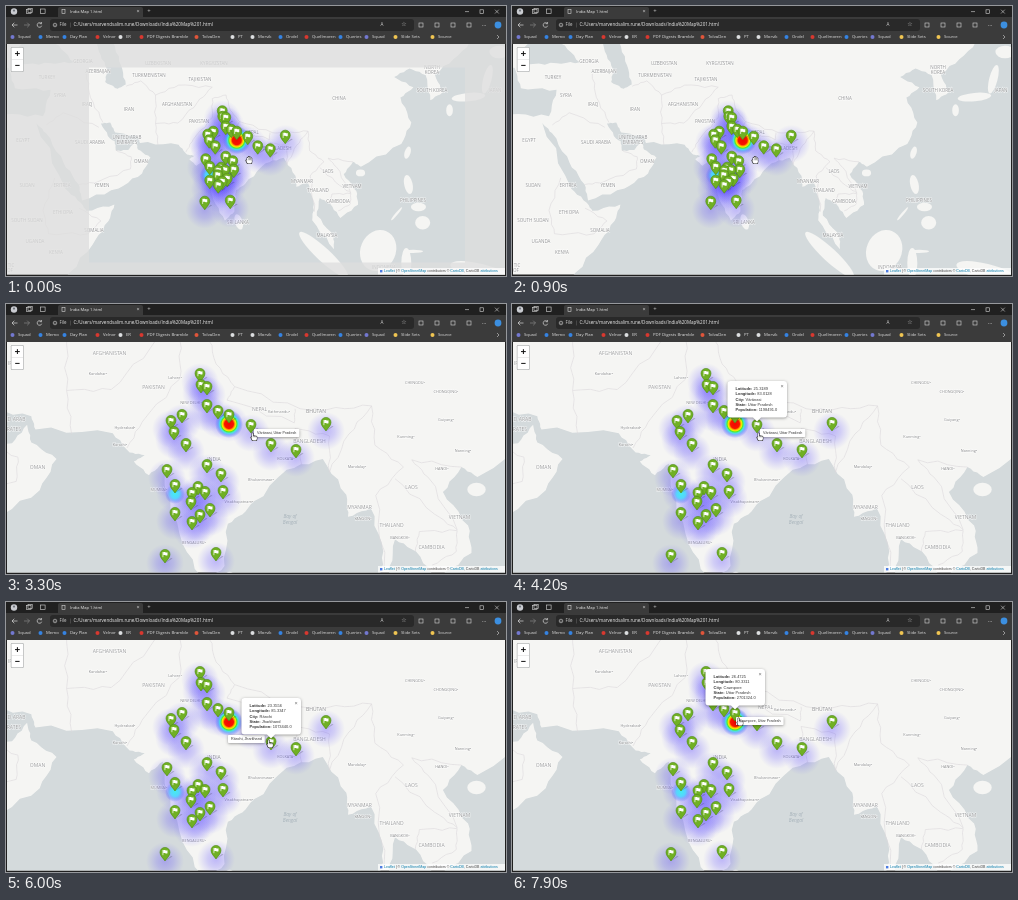
Write an HTML page with a canvas that moves like this. It is 500 by 270 pixels and loops after 8 s.

```html
<!DOCTYPE html>
<html lang="en">
<head>
<meta charset="utf-8">
<title>India Map</title>
<style>
html, body { margin: 0; width: 100%; height: 100%; overflow: hidden; background: #202020; }
canvas { display: block; width: 500px; height: 270px; }
</style>
</head>
<body>
<canvas id="stage"></canvas>
<script>
const canvas = document.getElementById('stage'), c = canvas.getContext('2d');
const dpr = window.devicePixelRatio || 1;
canvas.width = 500 * dpr;
canvas.height = 270 * dpr;

const LOOP = 8000, STEP = 100, CX = 238.5, CY = 148.5;
const UI = '"Open Sans", "Noto Sans", sans-serif', ARIAL = '"Liberation Sans", Arial, sans-serif';
const SEA = '#d4dadc', LAND = '#f5f5f3';

// Flat lon, lat pairs
const coast = [39.2,-6, 46,2.4, 49.8,8, 51.2,11.9, 44.5,10.4, 43.2,12.3, 39.5,15.5, 32.6,29.9, 34.9,27.8, 39.1,21.4,
  42.7,16.5, 43.5,12.8, 52.2,15.6, 57.8,19, 59.8,22.5, 56.8,24.3, 56.3,26.2, 54.5,24.2, 51.6,24, 51.3,26, 50.2,26.6, 48,29.8,
  50.2,30, 51.4,27.9, 56.8,27.1, 57.3,25.7, 66.5,25.3, 68.5,23.2, 70.3,22.9, 69,22.2, 70.8,20.7, 72.5,22, 72.8,19,
  74.8,12.9, 77.5,8.1, 79.8,10.3, 80.2,15.2, 82.3,16.6, 87.2,21.3, 91.5,22.5, 94.3,18.5, 94.5,16, 97.2,17,
  98.7,12, 98.3,8.2, 103.5,1.3, 103.4,4.3, 99.4,9.3, 100.1,13.4, 102.6,12, 105,8.7, 109.2,11.8, 108.8,15, 105.8,18.8,
  108,21.6, 109.9,20.5, 119.5,25.5, 121.9,30, 119.3,35, 122.4,37, 117.8,38.9, 121.5,40.5, 125.3,39.3, 126.4,34.5,
  129.3,36, 127.5,39.4, 133,42.8, 138,46.5, 150,46.5, 150,-6];
const inland = [
  [47.5,43.5, 49.5,40.3, 49,38, 52,36.7, 53.9,37.5, 52.8,41, 51,45, 47,45],
  [28,44, 29,41.2, 36,41.4, 41.5,41.6, 38,44.5, 31,46],
  [22,41, 26,40.6, 27.5,36.8, 36,36.5, 34.2,31.3, 25,31.7]
];
// lon, lat, half width, half height in degrees, tilt
const islands = [[80.8,7.8,.9,1.9,-.3], [101,0,7.8,1.6,.75], [114,1,4.2,5,.4], [120.7,-2,1.2,3.6], [122.3,.8,2.4,.4],
  [121.2,16.5,1,2.3,-.2], [123.6,11.3,1.8,1], [124.6,7.6,1.8,1.6], [118.4,9.7,.3,2,.7], [121,23.6,.7,1.5,.3],
  [109.8,19.1,1.1,.8], [131,32.5,.8,1.4], [135.5,35.1,4,1,-.1], [140,38.5,1,3.5,.25], [142.8,43.4,2.3,1.5],
  [138.5,-4.2,7.5,2,.25]];
const borders = [
  [68.2,23.7, 70,26.5, 74.5,31, 74.5,34.8, 77.8,35.5, 78.8,32.5, 81,30.2, 88.8,27.9, 92,27.8, 97.3,28.2],
  [81,30.2, 80.1,28.8, 88.1,26.4, 88.2,27.9],
  [89,21.8, 88.2,25.8, 92.3,25, 92.3,21, 94.6,25.2, 97.3,28.2, 97.7,24, 101.1,21.6, 97.8,18.4, 98.8,10.2],
  [100.1,20.3, 104.8,16.3, 107.5,14.5, 104,20.5, 102.1,22.4, 108,21.6],
  [102.5,12, 103,14.3, 107.5,14.4, 107.4,12, 104.5,10.4],
  [61.6,25.2, 61,29.8, 66.3,29.9, 70.9,34, 74.5,37, 66.5,37.4, 61,35.5, 61,29.8],
  [54,37.2, 57.5,38.2, 61,35.5],
  [48.5,30, 45.5,35, 44.5,39.5],
  [35,29.5, 39,32, 47.5,29],
  [42.8,16.5, 47,17, 55,20, 55.2,22.7, 51.5,24.2],
  [37,18, 34.2,10.5, 35.5,5, 45,5, 48,8, 42.8,11]
];

const countries = [['TURKEY',41,72], ['EGYPT',17,135], ['SYRIA',54,90], ['IRAQ',81,99], ['IRAN',123,104],
  ['GEORGIA',77,56], ['AZERBAIJAN',92,66], ['TURKMENISTAN',143,70], ['UZBEKISTAN',152,58], ['KYRGYZSTAN',208,58],
  ['TAJIKISTAN',194,74], ['AFGHANISTAN',171,99], ['PAKISTAN',193,116], ['CHINA',333,93], ['NEPAL',246,127],
  ['BANGLADESH',271,143], ['MYANMAR',296,176], ['LAOS',322,166], ['VIETNAM',346,181], ['THAILAND',312,185],
  ['CAMBODIA',332,196], ['SRI LANKA',232,217], ['MALAYSIA',321,230], ['PHILIPPINES',407,195], ['NORTH',426,62],
  ['KOREA',426,67], ['SOUTH KOREA',426,85], ['JAPAN',489,85], ['SAUDI ARABIA',84,137],
  ['UNITED ARAB',121,132], ['EMIRATES',121,137], ['OMAN',135,156], ['YEMEN',96,180], ['ERITREA',56,180],
  ['SUDAN',21,180], ['ETHIOPIA',57,207], ['SOUTH SUDAN',21,215], ['SOMALIA',88,225], ['UGANDA',29,236],
  ['KENYA',50,247], ['INDONESIA',378,262], ['TIC',5,260], ['OF',4,265]];
const cities = [['BHUTAN',310,108], ['INDIA',208,156], ['NEW DELHI•',185,99], ['Kandahar•',92,70], ['Lahore•',169,74],
  ['Karachi•',114,141], ['Hyderabad•',119,124], ['Kathmandu•',273,108], ['MUMBAI•',153,186], ['KOLKATA•',280,155],
  ['Bhubaneswar•',255,176], ['Visakhapatnam•',233,198], ['BENGALURU•',188,239], ['CHENGDU•',409,79],
  ['CHONGQING•',440,88], ['Guiyang•',440,116], ['Kunming•',400,133], ['Nanning•',457,147], ['HANOI•',436,165],
  ['Mandalay•',351,163], ['YANGON•',357,215], ['BANGKOK•',394,234]];

// Pin tips at the closer zoom
const pins = [[194,78], [195,89], [201,91], [201,109], [212,115], [176,119], [223,119], [165,125], [320,127], [245,129],
  [168,136], [180,148], [265,148], [290,154], [201,169], [161,174], [215,178], [169,189], [192,191], [217,195], [199,196],
  [186,197], [185,206], [204,213], [169,217], [194,219], [186,226], [210,257], [159,259]];

const popups = [
  { on: 3900, off: 5700, x: 245, y: 121, rows: ['25.3189', '83.0128', 'Vārānasi', 'Uttar Pradesh', '1198491.0'] },
  { on: 5700, off: 7400, x: 265, y: 140, rows: ['23.3556', '85.3347', 'Rānchi', 'Jharkhand', '1073440.0'] },
  { on: 7400, off: LOOP, x: 223, y: 111, rows: ['26.4725', '80.3311', 'Cawnpore', 'Uttar Pradesh', '2701324.0'] }
];
const fields = ['Latitude', 'Longitude', 'City', 'State', 'Population'];
const tooltips = [
  { on: 2900, off: 4400, x: 248, y: 125, label: 'Vārānasi, Uttar Pradesh' },
  { on: 5000, off: 6200, x: 222, y: 133, label: 'Rānchi, Jharkhand' },
  { on: 7000, off: LOOP, x: 224, y: 115, label: 'Cawnpore, Uttar Pradesh' }
];
// time, x, y
const cursorPath = [[0,243,154], [2300,243,154], [2900,248,133], [4400,248,133], [5000,264,142], [6200,264,142],
  [6900,230,122], [7200,228,120], [LOOP,228,120]];

const PURPLE = '#7378d0', BLUE = '#3583e2', RED = '#d8382f', YELLOW = '#f0c552', PALE = '#dcdee0';
const bookmarks = [['Squad',6,PURPLE], ['Memo',34,BLUE], ['Day Plan',58,BLUE], ['Velnor',91,RED],
  ['ER',114,PALE], ['PDF Digests Bramble',135,RED], ['TolvaDen',190,'#e0553a'], ['PT',226,PALE],
  ['Morvik',246,PALE], ['Ondel',274,BLUE], ['Quellmoren',300,RED], ['Queries',334,BLUE],
  ['Squad',360,PURPLE], ['Slide Sets',389,YELLOW], ['Source',426,YELLOW]];

const clamp = v => Math.max(0, Math.min(1, v));
const ramp = (t, from, length) => clamp((t - from) / length);

function project(lon, lat) {
  return [8.4 * lon - 451.8, 348.95 - 481.3 * Math.asinh(Math.tan(lat * Math.PI / 180))];
}

// Adds small bends between the points
function trace(path, points) {
  let last;
  for (let i = 0; i < points.length; i += 2) {
    const [x, y] = project(points[i], points[i + 1]);
    if (last) {
      const dx = x - last[0], dy = y - last[1];
      for (let j = 1; j < 5; j++) {
        const bend = .035 * Math.sin(i * 5 + j * 2.3);
        path.lineTo(last[0] + dx * j / 5 - dy * bend, last[1] + dy * j / 5 + dx * bend);
      }
      path.lineTo(x, y);
    } else path.moveTo(x, y);
    last = [x, y];
  }
}

const seaPath = new Path2D(), islandPath = new Path2D(), borderPath = new Path2D();
[coast, ...inland].forEach(s => trace(seaPath, s));
borders.forEach(b => trace(borderPath, b));
for (const [lon, lat, w, h, tilt = 0] of islands) {
  const island = new Path2D();
  island.ellipse(...project(lon, lat), w * 8.4, h * 8.4, tilt, 0, 2 * Math.PI);
  islandPath.addPath(island);
}

function text(str, x, y, size, color, { font = UI, align = 'left', weight = '', halo } = {}) {
  c.font = `${weight} ${size}px ${font}`;
  c.textAlign = align;
  c.textBaseline = 'middle';
  if (halo) {
    c.strokeStyle = halo;
    c.lineWidth = 1;
    c.strokeText(str, x, y);
  }
  c.fillStyle = color;
  c.fillText(str, x, y);
  return c.measureText(str).width;
}

function box(x, y, w, h, r, fill) {
  c.beginPath();
  c.roundRect(x, y, w, h, r);
  c.fillStyle = fill;
  c.fill();
}

function dot(x, y, r, fill) {
  c.beginPath();
  c.arc(x, y, r, 0, 7);
  c.fillStyle = fill;
  c.fill();
}

function line(color, width, ...points) {
  c.beginPath();
  for (let i = 0; i < points.length; i += 2) c.lineTo(points[i], points[i + 1]);
  c.strokeStyle = color;
  c.lineWidth = width;
  c.stroke();
}

function glow(x, y, r, stops) {
  const g = c.createRadialGradient(x, y, 0, x, y, r);
  stops.forEach(([at, color]) => g.addColorStop(at, color));
  dot(x, y, r, g);
}

function zoomAround(s) {
  c.translate(CX, CY);
  c.scale(s, s);
  c.translate(-CX, -CY);
}

function drawLand(k) {
  c.save();
  c.fillStyle = LAND;
  c.fillRect(0, 0, 500, 270);
  zoomAround(k);
  c.fillStyle = SEA;
  c.fill(seaPath);
  c.fillStyle = LAND;
  c.fill(islandPath);
  c.strokeStyle = '#dcd9dc';
  c.lineWidth = .6 / k;
  c.stroke(borderPath);
  c.restore();
}

function drawLabels(k, near) {
  const opts = { align: 'center', halo: 'rgba(255,255,255,.75)' };
  c.save();
  c.globalAlpha = 1 - near;
  zoomAround(k * 2);
  if (near < 1) countries.forEach(([s, x, y]) => text(s, x, y, 4.5, '#8f9092', opts));
  c.restore();
  if (!near) return;
  c.globalAlpha = near;
  for (const [s, x, y] of countries) {
    const ny = 2 * y - CY;
    if (ny > 42) text(s, 2 * x - CX, ny, 5, '#98999b', opts);
  }
  cities.forEach(([s, x, y]) => text(s, x, y, s.endsWith('•') ? 3.8 : 5, '#87888a', opts));
  ['Bay of', 'Bengal'].forEach((s, i) => text(s, 284, 213 + i * 6, 4.8, '#a4b0b8', { align: 'center', weight: 'italic' }));
  c.globalAlpha = 1;
}

function drawHeat(place) {
  for (const p of pins) {
    const [x, y] = place(p);
    glow(x, y, 19, [[0, 'rgba(90,70,255,.36)'], [.45, 'rgba(95,80,255,.24)'], [1, 'rgba(110,100,255,0)']]);
  }
  glow(...place([169, 190]), 10, [[0, 'rgba(60,240,240,.95)'], [.45, 'rgba(70,215,255,.85)'], [.7, 'rgba(90,150,255,.5)'], [1, 'rgba(90,90,255,0)']]);
  glow(...place([223, 120]), 14, [[0, '#f00800'], [.32, '#f81400'], [.42, '#ffb000'], [.49, '#f4f000'], [.56, '#50e830'],
    [.66, 'rgba(60,230,220,.9)'], [.78, 'rgba(80,150,255,.6)'], [1, 'rgba(90,90,255,0)']]);
}

function drawPin([x, y]) {
  c.save();
  c.translate(x, y);
  c.beginPath();
  c.moveTo(0, 0);
  c.lineTo(6, -5);
  c.lineTo(7.5, -4.5);
  c.fillStyle = 'rgba(40,40,60,.25)';
  c.fill();
  c.beginPath();
  c.moveTo(0, 0);
  c.bezierCurveTo(-1.5, -2.6, -5, -5, -5, -8.6);
  c.arc(0, -8.6, 5, Math.PI, 0);
  c.bezierCurveTo(5, -5, 1.5, -2.6, 0, 0);
  c.fillStyle = '#70b024';
  c.fill();
  c.strokeStyle = '#4f8a1a';
  c.lineWidth = .6;
  c.stroke();
  line('#fff', .7, -2.1, -11, -2.1, -5.8);
  c.beginPath();
  c.moveTo(-1.8, -10.7);
  c.bezierCurveTo(0, -11.8, .8, -9.6, 2.5, -10.7);
  c.lineTo(2.5, -7.8);
  c.bezierCurveTo(.8, -6.7, 0, -8.9, -1.8, -7.8);
  c.fillStyle = '#fff';
  c.fill();
  c.restore();
}

function withShadow(draw) {
  c.save();
  c.shadowColor = 'rgba(0,0,0,.4)';
  c.shadowBlur = 3 * dpr;
  c.shadowOffsetY = .7 * dpr;
  draw();
  c.restore();
}

function drawPopup(t, { on, off, x, y, rows }) {
  if (t < on || t >= off) return;
  const left = x - 29.5, top = y - 44;
  c.save();
  c.globalAlpha = ramp(t, on - 100, 200);
  withShadow(() => {
    c.beginPath();
    c.roundRect(left, top, 59.5, 36.5, 3.2);
    c.moveTo(x + 4, top + 36.4);
    c.lineTo(x, top + 40.5);
    c.lineTo(x - 4, top + 36.4);
    c.fillStyle = '#fff';
    c.fill();
  });
  rows.forEach((value, i) => {
    const ly = top + 8 + i * 5.2;
    const w = text(fields[i] + ':', left + 8, ly, 4, '#333', { font: ARIAL, weight: 'bold' });
    text(value, left + 9.2 + w, ly, 4, '#333', { font: ARIAL });
  });
  text('×', left + 54.5, top + 5, 5.5, '#666', { font: ARIAL, align: 'center' });
  c.restore();
}

function drawTooltip(t, { on, off, x, y, label }) {
  if (t < on || t >= off) return;
  c.font = `3.7px ${ARIAL}`;
  const w = c.measureText(label).width;
  withShadow(() => box(x, y, w + 6, 8, .8, '#fff'));
  text(label, x + 3, y + 4.2, 3.7, '#333', { font: ARIAL });
}

function drawCursor(t) {
  const i = cursorPath.findIndex(p => p[0] > t);
  const [t0, x0, y0] = cursorPath[i - 1], [t1, x1, y1] = cursorPath[i];
  const p = ramp(t, t0, t1 - t0), e = p * p * (3 - 2 * p);
  const pointing = tooltips.some(tip => t >= tip.on - 100 && t < tip.off);
  const fingers = pointing ? [-3.6, -.8, -.6, -.2] : [-2, -3, -2.6, -1.5];
  c.save();
  c.translate(x0 + (x1 - x0) * e, y0 + (y1 - y0) * e);
  c.lineCap = 'round';
  // Dark pass first gives the outline
  for (const [color, grow] of [['#222', .5], ['#fff', 0]]) {
    fingers.forEach((tip, n) => line(color, 1 + 2 * grow, n * 1.2 - 1.4, tip, n * 1.2 - 1.4, 1.5));
    line(color, 1 + 2 * grow, -2.6, .6, -1, 2.6);
    box(-1.9 - grow, .2 - grow, 4.6 + 2 * grow, 3.2 + 2 * grow, 1, color);
  }
  c.restore();
}

function drawControls() {
  box(4.8, 41, 13, 25, 1.3, '#b4b6b6');
  box(5.5, 41.7, 11.6, 23.6, .8, '#fff');
  line('#ccc', .4, 5.5, 53.5, 17.1, 53.5);
  line('#111', 1, 9, 47.6, 13.8, 47.6);
  line('#111', 1, 11.4, 45.2, 11.4, 50);
  line('#111', 1, 9.2, 59.4, 13.6, 59.4);
  c.fillStyle = 'rgba(255,255,255,.75)';
  c.fillRect(372, 262, 127, 6.5);
  c.fillStyle = '#4c7be1';
  c.fillRect(374, 264, 2.4, 2.4);
  const parts = ['Leaflet', ' | © ', 'OpenStreetMap', ' contributors © ', 'CartoDB', ', CartoDB ', 'attributions'];
  let x = 378;
  parts.forEach((s, i) => x += text(s, x, 265.4, 3.55, i % 2 ? '#444' : '#0078a8', { font: ARIAL }));
}

function drawBrowser() {
  const ink = '#d6d6d6', dim = '#858585';
  c.fillStyle = '#202020';
  c.fillRect(0, 0, 500, 11);
  c.fillStyle = '#3b3b3b';
  c.fillRect(0, 11, 500, 27);
  box(52, 1, 85, 12, 2, '#3b3b3b');
  dot(8, 5.5, 3.2, '#c9cbd0');
  dot(8, 4.6, 1.1, '#70757c');
  c.strokeStyle = ink;
  c.lineWidth = .6;
  c.strokeRect(20.5, 3.5, 4.5, 4);
  c.strokeRect(22, 2.6, 4.2, 4);
  c.strokeRect(34.5, 3, 4.6, 4.6);
  c.strokeRect(56, 3.3, 3, 4.2);
  text('India Map 1.html', 64, 5.6, 4.1, '#eee');
  text('×', 132, 5.5, 5.5, ink, { align: 'center' });
  text('+', 143, 5.5, 6, ink, { align: 'center' });
  line(ink, .6, 459, 5.6, 463, 5.6);
  c.strokeRect(474, 3.8, 3.6, 3.6);
  line(ink, .6, 489, 3.7, 492.8, 7.5);
  line(ink, .6, 492.8, 3.7, 489, 7.5);

  for (const [tip, dir, color] of [[6, 1, ink], [23.5, -1, dim]]) {
    line(color, .7, tip, 19, tip + 5.5 * dir, 19);
    line(color, .7, tip + 2.3 * dir, 16.7, tip, 19, tip + 2.3 * dir, 21.3);
  }
  c.beginPath();
  c.arc(33.5, 19, 2.3, .3, 5.6);
  c.strokeStyle = ink;
  c.stroke();
  line(ink, .7, 35.6, 16, 35.4, 17.8, 33.7, 17.6);
  box(44, 13, 364, 12, 3, '#292929');
  c.beginPath();
  c.arc(49, 19, 1.8, 0, 7);
  c.strokeStyle = ink;
  c.lineWidth = .6;
  c.stroke();
  line(ink, .6, 49, 18.5, 49, 20);
  text('File', 53.5, 19, 4.4, ink);
  line('#666', .5, 64.5, 16.5, 64.5, 21.5);
  text('C:/Users/marvendsalim.rune/Downloads/India%20Map%201.html', 67.5, 19, 4.55, '#f0f0f0');
  text('A', 376, 18.8, 4.6, ink, { align: 'center' });
  text('☆', 398, 18.8, 6, ink, { align: 'center', font: '"DejaVu Sans", sans-serif' });
  c.strokeStyle = ink;
  c.lineWidth = .6;
  for (let x = 413; x < 470; x += 16) c.strokeRect(x, 17, 4, 4);
  text('…', 478, 18, 6, ink, { align: 'center' });
  dot(492, 19, 3.4, '#3c8fe0');

  for (const [name, x, color] of bookmarks) {
    dot(x + .5, 31, 2, color);
    text(name, x + 6, 31.1, 4.25, '#e4e4e4');
  }
  line(ink, .6, 491, 29, 493, 31, 491, 33);
}

function draw(t) {
  c.setTransform(dpr, 0, 0, dpr, 0, 0);
  c.fillStyle = '#202020';
  c.fillRect(0, 0, 500, 270);

  const zoom = 1 - (1 - ramp(t, 1000, 300)) ** 3, k = (1 + zoom) / 2;
  const place = ([x, y]) => [CX + (x - CX) * k, CY + (y - CY) * k];
  c.save();
  c.beginPath();
  c.rect(1, 38, 498, 230.5);
  c.clip();
  drawLand(k);
  drawLabels(k, ramp(t, 1300, 200));
  // Outer tiles still loading
  const loading = .75 * (1 - ramp(t, 0, 300));
  if (loading) {
    c.beginPath();
    c.rect(0, 38, 500, 232);
    c.rect(83, 61.5, 376, 195);
    c.fillStyle = `rgba(222,222,222,${loading})`;
    c.fill('evenodd');
  }
  drawHeat(place);
  pins.forEach(p => drawPin(place(p)));
  tooltips.forEach(tip => drawTooltip(t, tip));
  popups.forEach(p => drawPopup(t, p));
  drawControls();
  drawCursor(t);
  c.restore();
  drawBrowser();
}

const start = performance.now();
function tick() {
  const t = (performance.now() - start) % LOOP;
  draw(Math.floor(t / STEP) * STEP);
  requestAnimationFrame(tick);
}
tick();
</script>
</body>
</html>
```
